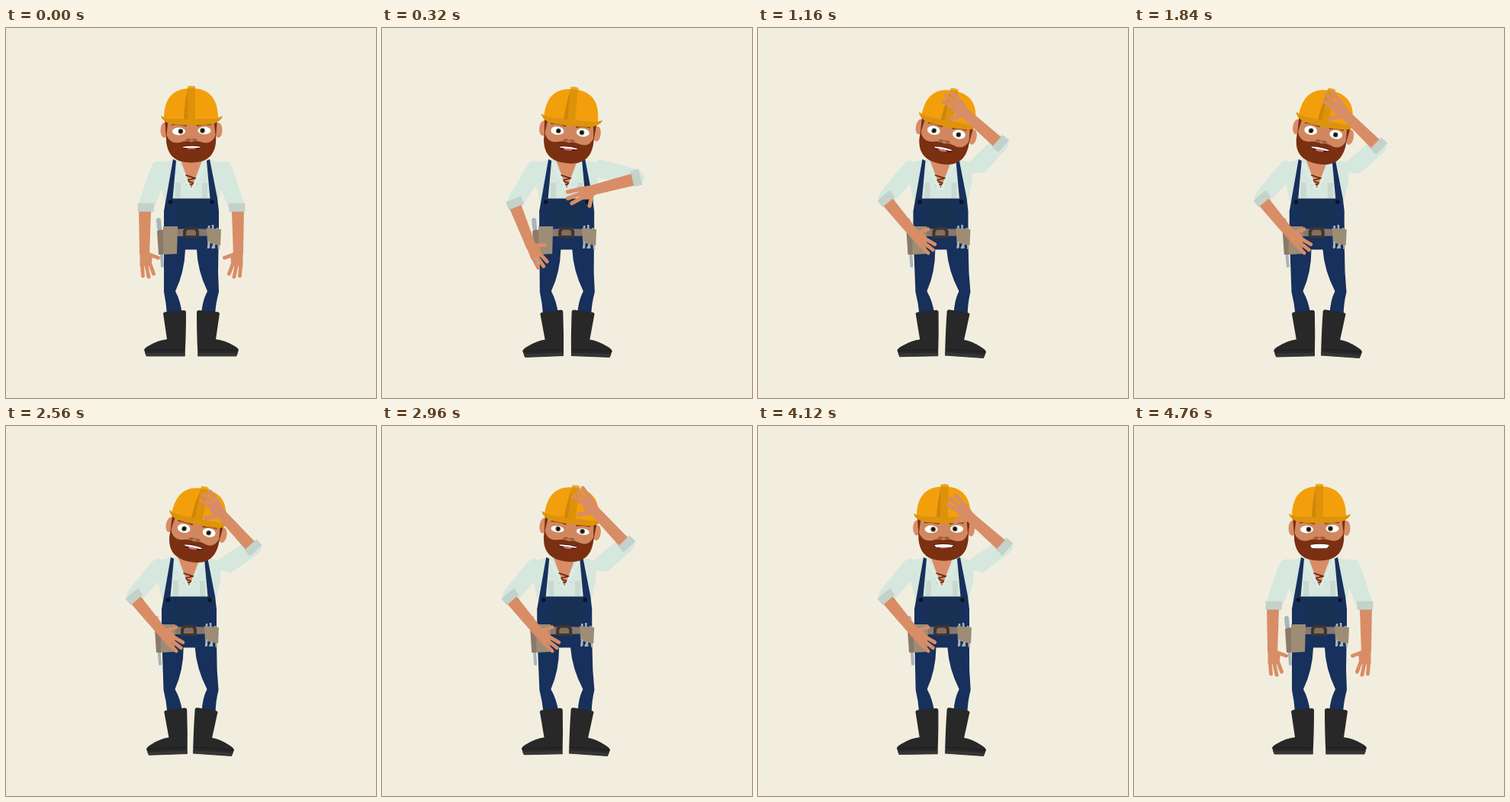
An HTML page with a canvas that plays this animation: 485x485 px, repeating every 4800 ms.

```html
<!DOCTYPE html>
<html lang="en">
<head>
<meta charset="utf-8">
<title>Builder scratching his helmet</title>
<style>
  html, body { margin: 0; width: 100%; height: 100%; overflow: hidden; background: #f2eedf; }
  canvas { display: block; width: 485px; height: 485px; }
</style>
</head>
<body>
<canvas width="485" height="485"></canvas>
<script>
const ctx = document.querySelector('canvas').getContext('2d');
const LOOP = 4800, STEP = 40, SCRATCH = 320;

const SKIN = '#d88d66', FACE = '#d18860', HAIR = '#7a3011', SHIRT = '#d6e7de', CUFF = '#c3d2cb',
      DENIM = '#17305c', BOOT = '#282828', LEATHER = '#9d8d75', STEEL = '#a8b5ba';

const FIELDS = ['time', 'tilt', 'headX', 'sway', 'leftBoot', 'rightBoot', 'raise', 'fore', 'eye', 'look', 'teeth', 'tongue'];
const POSES = [
  [0, 0, 0, 0, 0, 0, 0, -138, 5, 2.5, 2, 2],
  [600, 11, -1, -1.5, -4, 4, 1, -138, 5.8, 0.5, 2.4, 2.8],
  [1160, 11, -3.5, -3.5, -1, 4, 1, -132, 5.8, 0.5, 2.4, 2.8],
  [2560, 11.5, -1, -3, -2, 4, 1, -138, 5.8, 0.5, 2.4, 2.8],
  [3360, 4, -2, -4.5, -0.6, 4, 1, -137, 2.7, 1, 2, 2.2],
  [4120, 1, 0, -2, -0.6, 4, 1, -132, 5, 2.5, 3.8, 1.5],
  [4640, 0, 0, 0, 0, 0, 0, -132, 5, 2.5, 5, 0],
  [4800, 0, 0, 0, 0, 0, 0, -132, 5, 2.5, 5, 0]
];

const mix = (a, b, k) => a + (b - a) * k;
const ease = k => k * k * (3 - 2 * k);

function poseAt(t) {
  const i = POSES.findIndex(p => p[0] > t), a = POSES[i - 1], b = POSES[i];
  const k = ease((t - a[0]) / (b[0] - a[0]));
  return Object.fromEntries(FIELDS.map((name, j) => [name, mix(a[j], b[j], k)]));
}

function fill(color, d) {
  ctx.fillStyle = color;
  ctx.fill(new Path2D(d));
}

function line(color, width, d, cap = 'round') {
  ctx.strokeStyle = color;
  ctx.lineWidth = width;
  ctx.lineCap = cap;
  ctx.stroke(new Path2D(d));
}

function oval(color, x, y, rx, ry = rx) {
  ctx.fillStyle = color;
  ctx.beginPath();
  ctx.ellipse(x, y, rx, ry, 0, 0, 7);
  ctx.fill();
}

function group(draw, x, y, angle = 0, sx = 1, sy = 1) {
  ctx.save();
  ctx.translate(x, y);
  ctx.rotate(angle * Math.PI / 180);
  ctx.scale(sx, sy);
  draw();
  ctx.restore();
}

const mirrored = draw => group(draw, 486, 0, 0, -1);

function legs(sway) {
  ctx.save();
  ctx.transform(1, 0, -sway / 90, 1, sway * 4, 0);
  fill(DENIM, `M207 258 H279 L278 320 L279 346 Q275 360 274 376 H256 Q257 358 264 345
    Q251 318 250 290.5 H235 Q234 320 222 345 Q229 358 231 376 H211 Q210 360 207 346Z`);
  ctx.restore();
}

function boot(angle) {
  group(() => {
    fill(BOOT, 'M-16 1 Q-15 -1 -12 -1 L11 -3 Q14 -3 14 0 Q14 30 12.5 57 H-38 L-41 49 Q-40 46 -34 43 Q-22 36 -11 35Z');
    line('#1e1e1e', 1.2, 'M-40 49 H12.5', 'butt');
    fill('#363636', 'M-40 53 H12.7 L12.5 57.5 H-38Z');
  }, 222 - angle * 0.6, 373, angle);
}

function elbowOf(arm) {
  const a = arm.upper * Math.PI / 180;
  return [201 - Math.sin(a) * arm.length, 183 + Math.cos(a) * arm.length];
}

function sleeve(arm) {
  group(() => fill(SHIRT, 'M-10 -2 Q-8 -8 2 -9 L13 4 L10.5 55 H-11 L-11 12Z'),
    201, 183, arm.upper, 1, arm.length / 55);
  oval(SHIRT, ...elbowOf(arm), 10.5);
}

function hand() {
  fill(SKIN, 'M-6 -3 H6 L10 6 L9 17 H-6Z');
  line(SKIN, 4.8, 'M-3.5 12 L-2 30 M1.5 12 L5.5 31 M6.5 12 L12 27');
  line(SKIN, 4.8, 'M4 1 L10 3 L18 6');
}

function forearm(arm) {
  group(() => {
    fill(SKIN, 'M-9.5 3 H6.5 L4.5 62 H-8.5Z');
    group(hand, -2, 60, arm.wrist, arm.side, arm.stretch);
    fill(CUFF, 'M-11 -5.5 L10.5 -5.5 L10 5.5 L-11 5.5Z');
  }, ...elbowOf(arm), arm.fore);
}

function torso() {
  fill(SHIRT, 'M201 177 L221 172 H264 L285 177 L284 203 L278 228 H208 L202 203Z');
  fill(SKIN, 'M227 168 H259 L243 211Z');
  line('#5b240d', 1.6, 'M236 193 L248 197 L236 200 L248 204 L238 206 L245 210');
  line('#dcebe3', 4, 'M224 176 L242 212 M262 176 L244 212', 'butt');
  fill('#c9d9d2', 'M222 203 H229 V223 H222Z M257 203 H264 V223 H257Z');
  fill(DENIM, `M219 172 L223 174 L218.5 223.5 H267.5 L263 174 L267 172 L277 223
    L279 240 V264 H207 V240 L210 223Z`);
  fill('#183052', 'M223 225 H265 V258 H223Z');
  oval('#101319', 215.5, 228, 2.8);
  oval('#101319', 270, 228, 2.8);
}

function belt() {
  line(STEEL, 4, 'M201 262 L205 312');
  line(STEEL, 6, 'M200 252 L201 262');
  fill('#87786c', 'M207 264 L243 263 L280 264 V272 L243 273 H207Z');
  fill('#3f342e', 'M235 261 H250 L253 266 V275 H232 V266Z');
  fill('#806f60', 'M238 264.5 H247 L249 267 V272 H236 V267Z');
  fill('#8b796a', 'M198 266 Q202 263 208 265 V297 H200Z');
  fill(LEATHER, 'M206 260 H225 L224 296 L206 297Z');
  line(STEEL, 2.5, 'M266 259 V288 M271 258 L273 289 M277 262 L279 290', 'butt');
  fill(LEATHER, 'M263 262 L282 264 L281 285 L274 284 L264 281Z');
  line(STEEL, 2.5, 'M266 280 L265 289 M273 283 L270 289', 'butt');
}

function eye(x, y, look, height) {
  ctx.save();
  ctx.beginPath();
  ctx.ellipse(x, y + (5 - height) * 0.5, 8.5, height, 0, 0, 7);
  ctx.clip();
  ctx.fillStyle = '#fff';
  ctx.fillRect(x - 10, y - 10, 20, 20);
  oval('#64704f', x + look, y, 3.4);
  oval('#141411', x + look, y, 2.4);
  ctx.restore();
}

function mouth(teeth, tongue) {
  const low = 154.5 + teeth + tongue;
  fill('#4d1509', `M230 155.5 Q242 152.5 257 155.5 Q253 ${low + 1} 243 ${low + 0.8} Q233 ${low + 1} 230 155.5Z`);
  fill('#fff', `M231 156 Q243 153.5 256 156 L253 ${155 + teeth} Q243 ${155.5 + teeth} 233 ${155 + teeth}Z`);
  if (tongue > 0.3) oval('#e4697c', 243, 155 + teeth + tongue / 2, 6, tongue / 2);
}

function helmet() {
  fill('#f39f0b', 'M207 119 C207 94 217 79 243 79 C270 79 278 97 278 119Z');
  fill('#cf8508', 'M238 81 Q234 98 233 120 H240 V80Z');
  fill('#de920a', 'M238 78 Q243 75 248 78 V121 H238Z');
  fill('#e9aa24', 'M238 79 V76.5 Q243 75 248 76.5 V79Z');
  fill('#df930a', 'M203 115 Q209 119 222 119.5 H264 Q278 119 284 115 Q283 122 270 126 Q243 129 216 126 Q204 122 203 115Z');
}

function head(p) {
  oval(SKIN, 207.5, 134, 5, 10);
  oval(SKIN, 278.5, 134, 5, 10);
  fill(FACE, 'M210 118 H275 V150 Q270 172 243 172 Q214 172 210 150Z');
  fill(HAIR, 'M208 120 H213 L212 127 L210 144Z M277 120 H272 L273 127 L275 144Z');
  line(HAIR, 2.2, 'M217 126.5 Q225 125 237 128 M250 128 Q260 125 269 126.5', 'butt');
  eye(226.5, 135.5, p.look, p.eye);
  eye(260, 134.5, -p.look, p.eye);
  fill('#b47050', 'M234 148 Q237 143 243 145 Q249 143 252 148Z');
  line('#8a4d35', 1.5, 'M237 146.5 H240 M246 146.5 H249');
  fill(HAIR, `M210 139 C213 148 219 152 228 150 Q237 147 243 149.5 Q249 147 258 150
    C267 152 272 148 275 139 C277 162 268 176.5 243 176.5 C217 176.5 209 162 210 139Z`);
  mouth(p.teeth, p.tongue);
  helmet();
}

function render(t) {
  const p = poseAt(t), r = p.raise;
  const rub = r * (1 - Math.cos((t - 640) / SCRATCH * 2 * Math.PI)) / 2;
  const hipArm = { upper: mix(18.5, 39, r), length: 55 - 3 * r, fore: -40 * r, wrist: 0, side: 1, stretch: 1 };
  const headArm = {
    upper: mix(18.5, 121 + 15 * rub, r), length: 55 - 9 * r, fore: p.fore * r,
    wrist: -11 * r, side: r > 0.5 ? -1.1 : 1, stretch: 1 + 0.12 * r
  };

  ctx.fillStyle = '#f2eedf';
  ctx.fillRect(0, 0, 485, 485);
  legs(p.sway);
  boot(p.leftBoot);
  mirrored(() => boot(-p.rightBoot));
  sleeve(hipArm);
  mirrored(() => sleeve(headArm));
  group(() => { torso(); belt(); }, p.sway, 0);
  group(() => { ctx.translate(-242, -172); head(p); }, 242 + p.headX, 172 + p.tilt * 0.12, p.tilt);
  forearm(hipArm);
  mirrored(() => forearm(headArm));
}

const start = performance.now();
function tick() {
  const t = (performance.now() - start) % LOOP;
  render(Math.floor(t / STEP) * STEP);
  requestAnimationFrame(tick);
}
tick();
</script>
</body>
</html>
```
